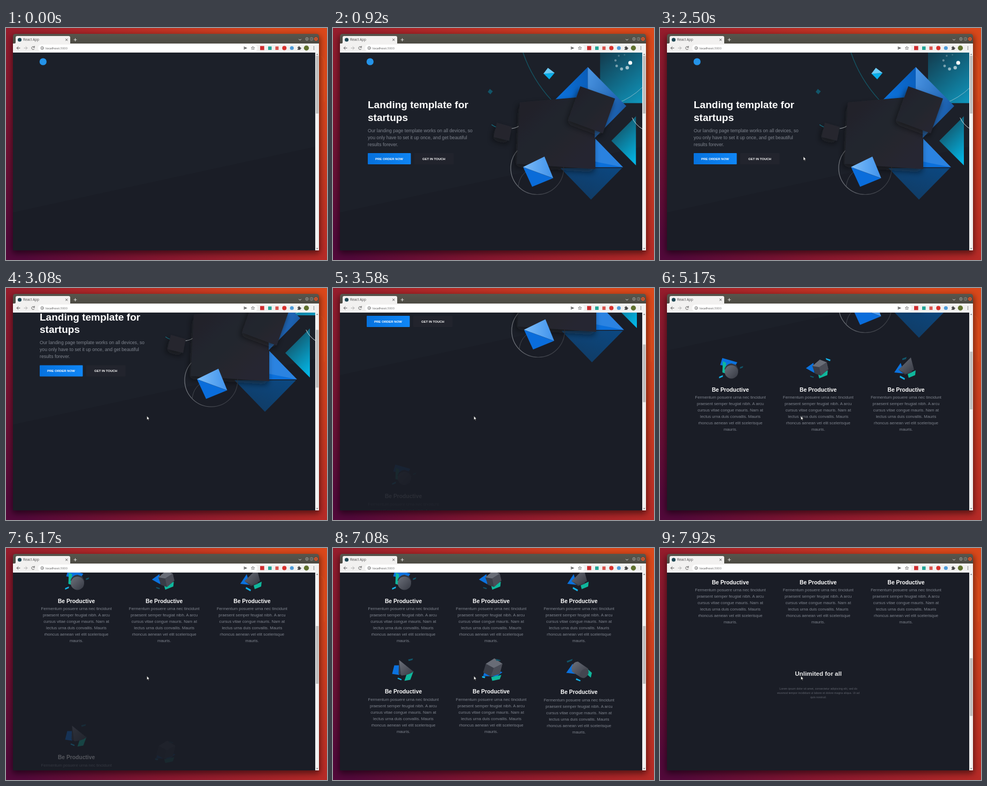
Recreate the animation shown at these times as an HTML page. Size 600 by 434 pixels, loop 8000 ms.

```html
<!DOCTYPE html>
<html lang="en">
<head>
<meta charset="utf-8">
<title>Landing page scroll</title>
<style>
html, body { margin: 0; width: 100%; height: 100%; overflow: hidden; background: #52093a; }
svg { display: block; width: 100vw; height: 100vh; }
.ui { font-family: "Open Sans", "Noto Sans", sans-serif; fill: #4a4a4a; }
#page text { font-family: "Liberation Sans", Arial, sans-serif; }
.mid { text-anchor: middle; }
.b { font-weight: 700; fill: #fff; }
.line { fill: none; stroke-linecap: round; }
.gray { fill: #7f848e; }
</style>
</head>
<body>
<svg viewBox="0 0 600 434">
  <defs>
    <linearGradient id="desk" x1="0" y1=".9" x2="1" y2=".25">
      <stop offset="0" stop-color="#52093a"/><stop offset=".3" stop-color="#86172f"/>
      <stop offset=".65" stop-color="#b52a27"/><stop offset="1" stop-color="#d9481b"/>
    </linearGradient>
    <linearGradient id="bar" x2="0" y2="1"><stop stop-color="#57554c"/><stop offset="1" stop-color="#42413b"/></linearGradient>
    <linearGradient id="btn"><stop stop-color="#0672de"/><stop offset="1" stop-color="#0f86f6"/></linearGradient>
    <linearGradient id="teal" x1=".1" x2=".9" y2="1"><stop stop-color="#133f52"/><stop offset="1" stop-color="#0f98bf"/></linearGradient>
    <linearGradient id="blueL" x1="1" y1="0" x2="0" y2="1"><stop stop-color="#0a5cb8"/><stop offset=".6" stop-color="#0b74e0"/><stop offset="1" stop-color="#0b74e0"/></linearGradient>
    <linearGradient id="blueR" x2="1" y2=".9"><stop stop-color="#4d97e6"/><stop offset=".7" stop-color="#1c62b2"/><stop offset="1" stop-color="#1a4a80"/></linearGradient>
    <linearGradient id="deep" x1="0" y1="1" x2=".8" y2="0"><stop stop-color="#11395f"/><stop offset="1" stop-color="#0c477f"/></linearGradient>
    <linearGradient id="cyan" x1=".3" x2=".8" y2="1"><stop stop-color="#154656"/><stop offset="1" stop-color="#03b6e6"/></linearGradient>
    <linearGradient id="pale"><stop stop-color="#7dbdf8"/><stop offset="1" stop-color="#3f92ec"/></linearGradient>
    <linearGradient id="slab" x2="1" y2="1"><stop stop-color="#21232b"/><stop offset="1" stop-color="#272831"/></linearGradient>
    <linearGradient id="ring"><stop stop-color="#777b82"/><stop offset=".5" stop-color="#454850"/><stop offset="1" stop-color="#393c44"/></linearGradient>
    <linearGradient id="steel" x2="1" y2="1"><stop stop-color="#6d717b"/><stop offset="1" stop-color="#353842"/></linearGradient>
    <filter id="soft" x="-20%" y="-20%" width="140%" height="140%"><feGaussianBlur stdDeviation="6"/></filter>
    <filter id="drop" x="-30%" y="-30%" width="160%" height="170%"><feDropShadow dx="-3" dy="6" stdDeviation="6" flood-color="#0d0f15" flood-opacity=".6"/></filter>
    <clipPath id="view"><rect x="13" y="46" width="565" height="370"/></clipPath>

    <!-- feature icons, centred on 0,0 -->
    <g id="icon0">
      <path fill="#0b72df" d="M-15-19L13-11 7-1-19-6z"/><path fill="#0fb79c" d="M-14-13L-8-10-9 10-15 8z"/>
      <path fill="#343741" d="M-11 2Q-8-8 2-9L11-6 15 3 12 15z"/><circle cx="2" cy="7" r="12.5" fill="url(#steel)"/>
      <path fill="#13b2e8" d="M-21 16L-14 13-14 16-21 19z"/><path fill="#12566a" d="M18-2L24-4 23-1 18 1z"/>
    </g>
    <g id="icon1">
      <path fill="#0b72df" d="M-23 0L-9-10-7 9z"/><path fill="#0fb79c" d="M0 12L18 4 17 13 2 19z"/>
      <path fill="#3a3d47" d="M-11-4L3-16 16-11 19 2 5 14-6 10z"/><path fill="#696d77" d="M-11-4L3-16 16-11 2-2z"/>
      <path fill="#4a4d57" d="M2-2L16-11 19 2 5 14z"/><path fill="#13b2e8" d="M14-19L23-16 22-13 15-16z"/><path fill="#12566a" d="M-15 14L-8 16-9 18-15 16z"/>
    </g>
    <g id="icon2">
      <path fill="#0b72df" d="M-22 8L-10-10-4 10z"/><path fill="#0fb79c" d="M3 11L18 4 17 13 5 18z"/>
      <path fill="#3a3d47" d="M-14 3L9-20 11 8-2 12z"/><path fill="url(#steel)" d="M-14 3L9-20 15 3 0 10z"/>
      <path fill="#13b2e8" d="M-11 14L-2 19-3 22-12 17z"/><path fill="#12566a" d="M-7-18L1-21 0-17-7-15z"/>
    </g>
    <g id="icon3">
      <path fill="#0b72df" d="M-17-9L-5-9-8 9-21 7z"/><path fill="#0fb79c" d="M7 5L19 2 13 18 2 20z"/>
      <path fill="#3a3d47" d="M-8-19L-9 7-2 10 19 3z"/><path fill="url(#steel)" d="M-8-19L-4 10Q8 10 19 3z"/>
      <path fill="#13b2e8" d="M-10 14L-3 17-4 19-11 16z"/><path fill="#12566a" d="M9-20L18-22 17-19 10-17z"/>
    </g>
    <g id="icon4">
      <path fill="#0b72df" d="M-15 11L-9-9 21 4 10 12z"/><path fill="#0fb79c" d="M0 13L19 9 16 17 2 20z"/>
      <path fill="#3a3d47" d="M-10-12L6-22 21-12 16 7-1 12-15 4z"/><path fill="#686c76" d="M-10-12L6-22 21-12 5-4z"/>
      <path fill="#4a4d57" d="M5-4L21-12 16 7-1 12z"/><path fill="#13b2e8" d="M-17 11L-11 12-12 15-17 14z"/><path fill="#12566a" d="M9-21L17-19 17-17 9-18z"/>
    </g>
    <g id="icon5">
      <path fill="#0b72df" d="M-24 4L-12-13-7 6z"/><path fill="#0fb79c" d="M16-3L24 4 22 13 15 7z"/>
      <path fill="url(#steel)" d="M-14-6Q-11-17-2-17L17-4Q16 11 4 13L-13 2z"/><ellipse cx="10" cy="5" rx="7" ry="9.5" transform="rotate(35 10 5)" fill="#444751"/>
      <path fill="#13b2e8" d="M-5 14L3 18 2 20-6 17z"/><path fill="#12566a" d="M-23-18L-12-22-13-19-22-15z"/>
    </g>
  </defs>

  <rect width="600" height="434" fill="url(#desk)"/>
  <path class="line" stroke="#ea671c" opacity=".5" d="M589 53Q596 54 595 75V138"/>
  <rect x="11" y="14" width="576" height="408" rx="5" opacity=".5" filter="url(#soft)"/>

  <!-- browser window -->
  <path fill="url(#bar)" d="M13 46V16Q13 11 18 11H580Q585 11 585 16V46z"/>
  <path fill="#f2f1f0" d="M13 29H16Q18 29 18 27V18Q18 15 21 15H117Q120 15 120 18V29H585V46H13z"/>
  <circle cx="25.5" cy="22" r="3.6" fill="#1c4653"/>
  <text class="ui" x="32" y="24.3" font-size="6.4">React App</text>
  <g class="line" stroke="#505050" stroke-width=".9">
    <path d="M111.5 20.2L115 23.8M115 20.2L111.5 23.8"/>
    <path stroke="#eee" d="M127 22H132M129.5 19.5V24.5M547.5 21L549.5 23 551.5 21"/>
    <path d="M26 37.5H20.2M23 34.7L20.2 37.5 23 40.3"/>
    <path stroke="#aaa" d="M34 37.5H39.8M37 34.7L39.8 37.5 37 40.3"/>
    <path d="M53 36A2.8 2.8 0 1 0 53 39M53.2 34V36.2H51"/>
  </g>
  <g stroke="#33332f" stroke-width=".5" fill="#85847c">
    <circle cx="562.5" cy="20.5" r="3.7"/><circle cx="571" cy="20.5" r="3.7"/><circle cx="579.4" cy="20.5" r="3.7" fill="#ea5b2d"/>
  </g>
  <path class="line" stroke="#3c3b36" stroke-width=".8" d="M561 20.5H564M569.7 19.3H572.3V21.7H569.7zM578.2 19.3L580.6 21.7M580.6 19.3L578.2 21.7"/>
  <rect x="60" y="31" width="410" height="13.4" rx="6.7" fill="#fff"/>
  <circle cx="67.7" cy="37.5" r="2.7" class="line" stroke="#555" stroke-width=".8"/>
  <path class="line" stroke="#555" stroke-width=".8" d="M67.7 37.4V38.9M67.7 36V36.1"/>
  <text class="ui" x="74" y="39.7" font-size="6.1">localhost:<tspan fill="#777">3000</tspan></text>
  <path fill="#555" d="M444.5 34.8L451 37.5 444.5 40.2V38L448 37.5 444.5 37z"/>
  <path class="line" stroke="#555" stroke-width=".7" d="M461.500 34.500L462.400 36.600 464.600 36.700 462.900 38.200 463.500 40.400 461.500 39.200 459.500 40.400 460.100 38.200 458.400 36.700 460.600 36.600z"/>
  <rect x="475" y="33.7" width="7.600" height="7.600" fill="#cf2b2e"/>
  <rect x="490" y="34.500" width="6.500" height="6.500" fill="#22a596"/>
  <rect x="503.500" y="34.500" width="6" height="6.500" fill="#d9534c"/>
  <circle cx="520.300" cy="37.500" r="4" fill="#d8302c"/>
  <circle cx="534.300" cy="37.500" r="3.600" fill="#4e9bd8"/>
  <path fill="#444" d="M545 35.500H547Q546.500 33.800 547.700 33.800T548.500 35.500H550.300V37Q552 36.600 552 37.800T550.300 38.700V40.700H545V39Q546.500 38.800 546.500 38T545 37.200z"/>
  <circle cx="561.500" cy="37.500" r="4.700" fill="#60722f"/>
  <g fill="#555"><circle cx="575.500" cy="35" r=".8"/><circle cx="575.500" cy="37.500" r=".8"/><circle cx="575.500" cy="40" r=".8"/></g>

  <!-- page -->
  <rect x="13" y="46" width="565" height="370" fill="#1a1d26"/>
  <g clip-path="url(#view)"><g id="page">
    <path fill="#1c2029" d="M13 46H578V222L13 345z"/>
    <circle cx="69.300" cy="63" r="6.600" fill="#2493e8"/>
    <g id="art">
      <rect x="501" y="46" width="90" height="94.500" fill="url(#teal)"/>
      <path class="line" stroke="#9fc6d2" stroke-width=".8" d="M532 141Q558 132 580 111"/>
      <g fill="#fff" id="dots"></g>
      <path class="line" stroke="#155362" stroke-width="1.400" d="M357 46Q374 96 411 136"/>
      <path fill="url(#blueL)" d="M478 73V219L405 146z"/><path fill="url(#blueR)" d="M478 73L550 146 478 219z"/>
      <path fill="url(#deep)" d="M427 262H542L484 321z"/>
      <path fill="#0b70dc" d="M492 207L544 260.500H492z"/><path fill="#fff" opacity=".13" d="M492 207L544 260.500 492 250z"/>
      <path fill="url(#cyan)" d="M522 211L568 165V257z"/>
      <path class="line" stroke="#d5dde0" d="M561 168Q567 181 580 189"/>
      <circle class="line" cx="383.500" cy="262" r="49.500" stroke="url(#ring)" stroke-width="1.200"/>
      <path class="line" stroke="#4e525a" stroke-width=".8" d="M348 297Q350 272 374 262"/>
      <path class="line" stroke="#177f94" stroke-width="1.100" d="M298.500 181Q303 184.500 309 186"/>
      <path class="line" stroke="#a9adb1" stroke-width="1.100" d="M336 188Q345 187 351 182"/>
      <g filter="url(#drop)">
        <path fill="url(#slab)" d="M351 139L490 127 492 264 345 254z"/>
        <path fill="#25272f" d="M308 177L336 185 331 211 302 204z"/>
      </g>
      <path filter="url(#drop)" fill="url(#slab)" d="M464 109L529 132 506 197 441 173z"/>
      <path fill="#0a6ddb" d="M357 260L413 281 374 297z"/><path fill="url(#pale)" d="M357 260L397 240.500 413.500 281z"/>
      <path fill="#08aeea" d="M395 85L416 84 406 96z"/><path fill="#6ecbf5" d="M395 85.500L403.500 74.500 416 84z"/>
      <path fill="#12566a" d="M295 114L300.500 118.500 296 124 291 119.500z"/>
    </g>
    <g id="copy">
      <g class="b" font-size="19"><text x="63" y="150">Landing template for</text><text x="63" y="173.500">startups</text></g>
      <g class="gray" font-size="8.660"><text x="63" y="194.500">Our landing page template works on all devices, so</text><text x="63" y="207.500">you only have to set it up once, and get beautiful</text><text x="63" y="220.500">results forever.</text></g>
      <rect x="63" y="234" width="80.500" height="21" rx="1" fill="url(#btn)"/><rect x="150" y="234" width="73.500" height="21" rx="1" fill="#22242d"/>
      <g class="b mid" font-size="6"><text x="103" y="246.700">PRE ORDER NOW</text><text x="186.500" y="246.700">GET IN TOUCH</text></g>
    </g>
    <g id="cards"></g>
    <g id="outro" class="mid">
      <text class="b" y="-23.600" font-size="16.650">Unlimited for all</text>
      <g fill="#666a74" font-size="7.600"><text y="14.700">Lorem ipsum dolor sit amet, consectetur adipiscing elit, sed do</text><text y="26">eiusmod tempor incididunt ut labore et dolore magna aliqua. Ut ad</text><text y="37.200">quis nostrud.</text></g>
    </g>
  </g></g>

  <rect x="578" y="46" width="7" height="370" fill="#f1f1f1"/>
  <rect id="thumb" x="579.200" width="5" height="108" fill="#bdbdbd"/>
  <path fill="#777" d="M579.800 50.300L581.700 48 583.600 50.300zM579.800 411.700L581.700 414 583.600 411.700z"/>
  <path id="mouse" fill="#fff" stroke="#111" stroke-width=".6" d="M0 0V7.200L1.700 5.700 2.800 8.200 3.900 7.700 2.800 5.300H5z"/>
</svg>
<script>
const $ = id => document.getElementById(id);
const LOOP = 8000, STEP = 83.34;
const lines = ['Fermentum posuere urna nec tincidunt', 'praesent semper feugiat nibh. A arcu',
  'cursus vitae congue mauris. Nam at', 'lectus urna duis convallis. Mauris', 'rhoncus aenean vel elit scelerisque', 'mauris.'];

$('dots').innerHTML = [0, 1, 2, 3, 4, 5, 6].map(i => {
  const a = .14 + i * .8;
  return `<circle cx="${543.5 + 14 * Math.cos(a)}" cy="${63.3 + 13.5 * Math.sin(a)}" r="${3.6 - i * .38}" opacity="${i ? .72 - i * .09 : 1}"/>`;
}).join('');

// origin of each card is the centre of its icon
const cards = [0, 1, 2, 3, 4, 5].map(i => ({ x: 131.5 + i % 3 * 164.2, y: 378 + (i > 2) * 169.6, start: (i < 3 ? 3500 : 5985) + i % 3 * 100 }));
$('cards').innerHTML = cards.map((c, i) => `<g class="mid"><use href="#icon${i}"/>
  <text class="b" y="43.5" font-size="10.3">Be Productive</text>
  <g class="gray" font-size="7.69">${lines.map((s, n) => `<text y="${57.4 + n * 12}">${s}</text>`).join('')}</g></g>`).join('');

// CSS "ease": cubic-bezier(.25, .1, .25, 1)
function ease(p) {
  if (p <= 0 || p >= 1) return p <= 0 ? 0 : 1;
  let lo = 0, hi = 1, s;
  for (let i = 0; i < 24; i++) {
    s = (lo + hi) / 2;
    if (.75 * s * (1 - s) + s * s * s < p) lo = s; else hi = s;
  }
  return .3 * s * (1 - s) ** 2 + 3 * s * s * (1 - s) + s ** 3;
}

// linear interpolation through [time, value] pairs
function track(keys, t) {
  const i = keys.findIndex(k => k[0] > t);
  if (i < 1) return keys[i ? keys.length - 1 : 0][1];
  const [t0, a] = keys[i - 1], [t1, b] = keys[i];
  return a + (b - a) * (t - t0) / (t1 - t0);
}

const scrollKeys = [[2720, 0], [3460, 182], [4500, 182], [4700, 228], [5500, 228], [5950, 319], [7100, 319], [7917, 523.5], [8000, 544]];
const mouseX = [[2167, 592], [2500, 268], [2667, 268], [2834, 263.3]];
const mouseY = [[2167, 12], [2500, 240.5], [2667, 240.5], [2834, 239.5]];

function place(el, x, y, opacity, scale = 1) {
  el.setAttribute('transform', `translate(${x} ${y}) scale(${scale})`);
  el.setAttribute('opacity', opacity);
}

function draw(now) {
  const t = Math.floor((now % LOOP + 5) / STEP) * STEP;
  const scroll = track(scrollKeys, t);
  place($('page'), 0, -scroll, 1);
  $('thumb').setAttribute('y', 52 + scroll * .2945);

  const intro = ease((t - 40) / 1000);
  place($('copy'), 229 * (1 - intro), 0, intro);
  place($('art'), -200 * (1 - intro), 0, intro);
  cards.forEach((c, i) => {
    const e = ease((t - c.start) / 1000);
    place($('cards').children[i], c.x, c.y + 165 * (1 - e), e);
  });
  const zoom = ease((t - 7590) / 1000);
  place($('outro'), 296, 778.5, Math.min(1, zoom * 1.6), .3 + .7 * zoom);
  place($('mouse'), track(mouseX, t), track(mouseY, t), t > 2240 ? 1 : 0);
  requestAnimationFrame(draw);
}
requestAnimationFrame(draw);
</script>
</body>
</html>
```
